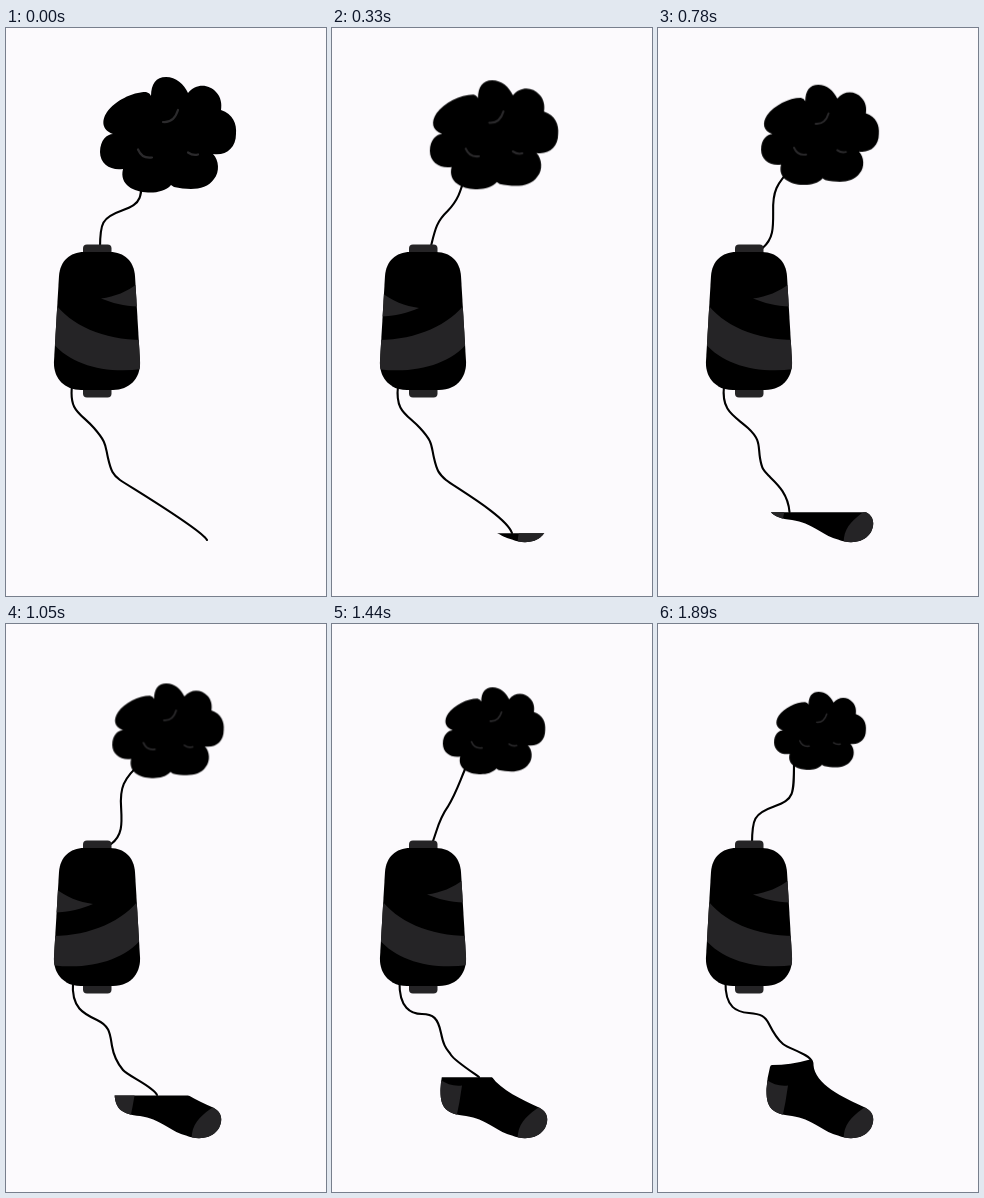
Animation, 320 px wide and 568 px high, one loop 2700 ms. Source, as an HTML page:

```html
<!DOCTYPE html>
<html lang="en">
<head>
<meta charset="utf-8">
<title>Cotton to sock</title>
<style>
  html, body { margin: 0; width: 100%; height: 100%; overflow: hidden; background: #fcfafd; }
  svg { display: block; width: 100%; height: 100%; }

  .grey { fill: #252426; }
  .thread { fill: none; stroke: #000; stroke-width: 2.1; stroke-linecap: round; }
  .crease { fill: none; stroke: #2b2a2c; stroke-width: 2.2; stroke-linecap: round; }

  /* One loop is 2700 ms: movement in 30 ms ticks up to 70 %, then a hold. */
  .cotton, .reveal, .feed, .yarn, .wrap {
    animation: 2.7s linear infinite;
  }

  .cotton { transform-origin: 162px 106.8px; animation-name: shrink; }
  @keyframes shrink {
    0% { transform: scale(1); animation-timing-function: steps(63); }
    70%, 100% { transform: scale(.675); }
  }

  .reveal { animation-name: knit; }
  @keyframes knit {
    0% { transform: translateY(520.8px); animation-timing-function: steps(63); }
    70%, 100% { transform: translateY(432px); }
  }

  .feed { animation-name: sway; }
  @keyframes sway {
    0% {
      d: path("M136 138 C136 171 136 175.5 116 182.5 C96 189.5 94 195 94 220");
      animation-timing-function: steps(31);
    }
    34.4444% {
      d: path("M136 138 C114 152.6 110.5 162.5 115 184 C119 202 119.5 214 106.7 220");
      animation-timing-function: steps(32);
    }
    70%, 100% { d: path("M136 138 C136 171 136 175.5 116 182.5 C96 189.5 94 195 94 220"); }
  }

  .yarn { animation-name: pull; }
  @keyframes pull {
    0% {
      d: path("M66 358 C63 384 75 385 88 400 S99 417 102 430 S107 447 114 452 S195 501 201 512");
      animation-timing-function: steps(11);
    }
    12.2222% {
      d: path("M66 358 C63 384 75 386 88 400 S99 417 102 430 S107 446 114 452 S174 488 180 505");
      animation-timing-function: steps(9);
    }
    22.2222% {
      d: path("M66 358 C63 384 76 387 88 399 S99 416 102 430 S106 444 112 449 S136 476 141 492");
      animation-timing-function: steps(6);
    }
    28.8889% {
      d: path("M66 358 C63 384 77 388 90 400 S100 418 102 430 S106 443 112 449 S130 465 131.5 484");
      animation-timing-function: steps(9);
    }
    38.8889% {
      d: path("M67 358 C65 384 78 390 91 396 S104 410 106 422 S112 440 117 446 S148 463 151 471");
      animation-timing-function: steps(13);
    }
    53.3333% {
      d: path("M67.5 358 C67 384 79 390 90 390 S106 394 109 409 S115 425 119 431 S143 450 147 453");
      animation-timing-function: steps(15);
    }
    70%, 100% {
      d: path("M67.5 358 C67 384 79 388 91 389 S107 392 111 400 S119 415 125 420 S152 430 154 438");
    }
  }

  /* The spool flips between two windings to look as if it turns. */
  .wrap { animation-timing-function: step-end; }
  .wrap.a { animation-name: wrapA; }
  .wrap.b { animation-name: wrapB; }
  @keyframes wrapA {
    0%, 23.3333%, 46.6667%, 70%, 100% { opacity: 1; }
    12.2222%, 35.5556%, 58.8889% { opacity: 0; }
  }
  @keyframes wrapB {
    0%, 23.3333%, 46.6667%, 70%, 100% { opacity: 0; }
    12.2222%, 35.5556%, 58.8889% { opacity: 1; }
  }
</style>
</head>
<body>
<svg viewBox="0 0 320 568">
  <defs>
    <path id="sock" d="M114 441 Q133 441 150 436 Q156 435 155.5 441 C156.5 460 185 473.5 207 483.5
      C216 488 217 496 213 504 C207 514 193 517 180 511.5 C163 507 157 496 134 492
      C114 490 108 484 108.5 465 Q109 454 112 443 Q112.5 441 114 441Z"/>
    <path id="body" d="M53 248 C54 233 64 224 78 224 H104 C118 224 128 233 129 248
      L134 333 C135 350 124 362 107 362 H75 C58 362 47 350 48 333Z"/>
    <path id="band" d="M48 274 C64 297 98 312 136 312 V341 C100 346 64 337 46 314Z"/>
    <clipPath id="inSock"><use href="#sock"/></clipPath>
    <clipPath id="inBody"><use href="#body"/></clipPath>
    <clipPath id="knitted"><rect class="reveal" width="320" height="140"/></clipPath>
  </defs>

  <g clip-path="url(#knitted)">
    <use href="#sock"/>
    <g class="grey" clip-path="url(#inSock)">
      <path d="M106 454 Q117 463 130 461.5 Q128 477 124 495 H100 V454Z"/>
      <path d="M207 483 C197 490 184 500 186 516 H220 V483Z"/>
    </g>
  </g>

  <path class="thread feed" d="M136 138 C136 171 136 175.5 116 182.5 C96 189.5 94 195 94 220"/>
  <path class="thread yarn" d="M66 358 C63 384 75 385 88 400 S99 417 102 430 S107 447 114 452 S195 501 201 512"/>

  <g class="grey">
    <rect x="77" y="216.5" width="28.5" height="14" rx="4"/>
    <rect x="77" y="355" width="28.5" height="14.5" rx="4"/>
  </g>
  <use href="#body"/>
  <g class="grey" clip-path="url(#inBody)">
    <g class="wrap a">
      <path d="M95 270.5 C109 268.5 121 264 132 255 V278.5 C118 278 106 275 95 270.5Z"/>
      <use href="#band"/>
    </g>
    <g class="wrap b" opacity="0">
      <path d="M49 264 C60 273 73 278 87 280 C76 285 63 288 48 288.5Z"/>
      <use href="#band" transform="translate(182 0) scale(-1 1)"/>
    </g>
  </g>

  <g class="cotton">
    <path d="M145 68 C145 56 150 49 160 49 C170 49 178 56 182 65 C190 55 203 56 210 64
      C215 69 216 76 215 82 C227 86 231 96 230 106 C230 120 220 128 207 126
      C213 132 214 144 208 151 C200 163 183 162 168 159 L165 157 C160 163 150 165 142 164.5
      C128 164 113 157 117 141 C105 143 94 136 94 124 C94 112 101 106 107 106
      C96 102 95 93 101 84 C109 73 126 64 140 64 Q144 65 145 68Z"/>
    <path class="crease" d="M157 94 Q168 95 172 82"/>
    <path class="crease" d="M132 121.5 Q136 131 146 129.5"/>
    <path class="crease" d="M182 124.5 Q187 128 192 126.5"/>
  </g>
</svg>
</body>
</html>
```
